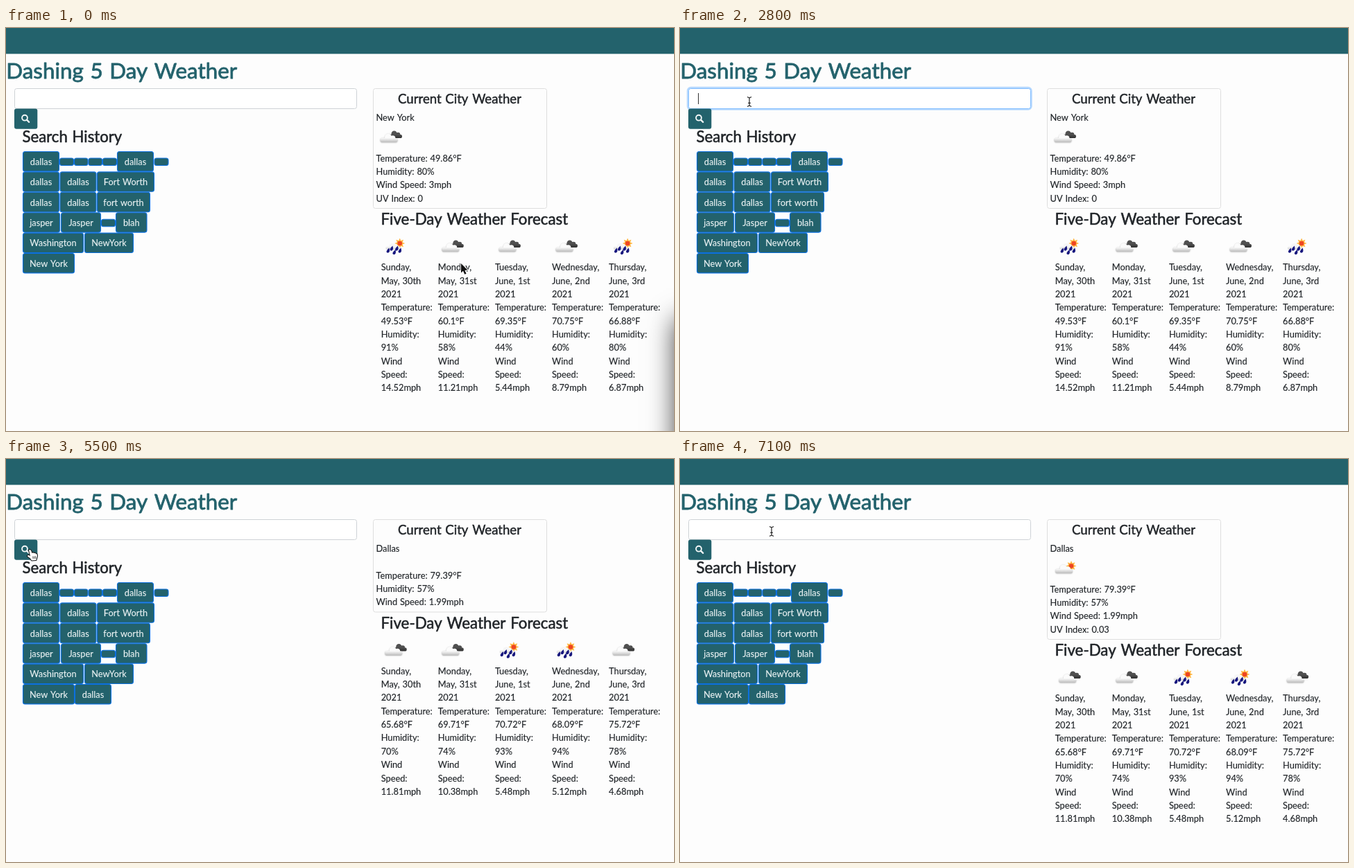
Recreate the animation shown at these times as an HTML page with a canvas. Size 963 by 582 pixels, loop 7.2 s.

```html
<!DOCTYPE html>
<html lang="en">
<head>
<meta charset="utf-8">
<title>Dashing 5 Day Weather</title>
<style>
  html, body { margin: 0; width: 100%; height: 100%; overflow: hidden; background: #fdfdfd; }
  canvas { display: block; }
</style>
</head>
<body>
<canvas id="stage" width="963" height="582"></canvas>
<script>
const ctx = document.getElementById('stage').getContext('2d');
const LOOP = 7200, STEP = 100, LINE = 19.35;
const TEAL = '#23626c', INK = '#212529', PAPER = '#fdfdfd';

// Moments of the session, in ms
const FOCUS = 1800, TYPE = 3000, KEY = 120, TYPED = 3600, MOVE = 4200;
const CLICK = 5000, CLEARED = 5200, RESULT = 5500, COMPLETE = 6100;
const QUERY = 'dallas';

const mousePath = [
  [0, 656, 340], [100, 656, 340], [800, 99, 105], [FOCUS, 99, 105],
  [FOCUS + 100, 100, 106.5], [MOVE, 100, 106.5], [4700, 34, 131],
  [6400, 34, 131], [6900, 132, 104.5], [LOOP, 132, 104.5]
];

// Label, left, right; an empty label is a small pill
const history = [
  [['dallas', 24, 77], ['', 77, 98], ['', 98, 118.5], ['', 118.5, 139], ['', 139, 160],
   ['dallas', 160, 213], ['', 213.5, 234.5]],
  [['dallas', 24, 77], ['dallas', 77.5, 130.5], ['Fort Worth', 131, 214]],
  [['dallas', 24, 77], ['dallas', 77.5, 130.5], ['fort worth', 131, 208]],
  [['jasper', 24, 78], ['Jasper', 79, 137], ['', 137, 158], ['blah', 158, 203.5]],
  [['Washington', 24, 112], ['NewYork', 113, 184]],
  [['New York', 24, 99]]
];

const days = ['Sunday,|May, 30th', 'Monday,|May, 31st', 'Tuesday,|June, 1st',
  'Wednesday,|June, 2nd', 'Thursday,|June, 3rd'];
const newYork = {
  city: 'New York', icon: 'cloudy', temp: '49.86', humidity: 80, wind: '3', uv: '0',
  forecast: [['rain', '49.53', 91, '14.52'], ['cloudy', '60.1', 58, '11.21'],
    ['cloudy', '69.35', 44, '5.44'], ['cloudy', '70.75', 60, '8.79'], ['rain', '66.88', 80, '6.87']]
};
const dallas = {
  city: 'Dallas', icon: 'sunny', temp: '79.39', humidity: 57, wind: '1.99', uv: '0.03',
  forecast: [['cloudy', '65.68', 70, '11.81'], ['cloudy', '69.71', 74, '10.38'],
    ['rain', '70.72', 93, '5.48'], ['rain', '68.09', 94, '5.12'], ['cloudy', '75.72', 78, '4.68']]
};

const clamp = v => Math.max(0, Math.min(1, v));
const ramp = (t, from, to) => clamp((t - from) / (to - from));
const smooth = u => u * u * (3 - 2 * u);

// A thin outline gives headings a medium weight
function text(str, x, y, { size = 12.8, color = INK, outline = 0.15, align = 'left' } = {}) {
  ctx.font = `${size}px Lato, "Open Sans", sans-serif`;
  ctx.wordSpacing = size * 0.05 + 'px';
  ctx.fillStyle = ctx.strokeStyle = color;
  ctx.lineWidth = outline;
  ctx.lineJoin = 'round';
  ctx.textAlign = align;
  ctx.fillText(str, x, y);
  ctx.strokeText(str, x, y);
}

function heading(str, x, y, size, options) {
  text(str, x, y, { size, outline: size * 0.025, ...options });
}

function box(x, y, w, h, r, fill, stroke, line = 1) {
  ctx.beginPath();
  ctx.roundRect(x, y, w, h, r);
  if (fill) { ctx.fillStyle = fill; ctx.fill(); }
  if (stroke) { ctx.strokeStyle = stroke; ctx.lineWidth = line; ctx.stroke(); }
}

function polygon(points, fill, stroke, line = 1) {
  ctx.beginPath();
  points.forEach(p => ctx.lineTo(...p));
  ctx.closePath();
  ctx.lineJoin = 'round';
  if (stroke) { ctx.strokeStyle = stroke; ctx.lineWidth = line; ctx.stroke(); }
  ctx.fillStyle = fill;
  ctx.fill();
}

function lines(paths, color, width) {
  ctx.beginPath();
  for (const [x, y, x2, y2] of paths) { ctx.moveTo(x, y); ctx.lineTo(x2, y2); }
  ctx.strokeStyle = color;
  ctx.lineWidth = width;
  ctx.stroke();
}

function disc(x, y, r, fill) {
  ctx.beginPath();
  ctx.arc(x, y, r, 0, Math.PI * 2);
  ctx.fillStyle = fill;
  ctx.fill();
}

function cloud(x, y, w, h, top, bottom) {
  const g = ctx.createLinearGradient(0, y, 0, y + h);
  g.addColorStop(0, top);
  g.addColorStop(0.5, top);
  g.addColorStop(1, bottom);
  ctx.beginPath();
  ctx.roundRect(x, y + h * 0.5, w, h * 0.5, h * 0.25);
  ctx.moveTo(x + w * 0.66, y + h * 0.42);
  ctx.ellipse(x + w * 0.46, y + h * 0.42, w * 0.2, h * 0.42, 0, 0, Math.PI * 2);
  ctx.moveTo(x + w * 0.88, y + h * 0.55);
  ctx.ellipse(x + w * 0.72, y + h * 0.55, w * 0.16, h * 0.33, 0, 0, Math.PI * 2);
  ctx.fillStyle = g;
  ctx.fill();
}

function sun(x, y) {
  const rays = [];
  for (let i = 0; i < 16; i++) {
    const a = i * Math.PI / 8, r = i % 2 ? 4.2 : 7.5;
    rays.push([x + r * Math.cos(a), y + r * Math.sin(a)]);
  }
  polygon(rays, '#ffb640');
  disc(x, y, 3.3, '#ee4522');
}

function whiteCloud(x, y, w, h) {
  ctx.save();
  ctx.shadowColor = 'rgba(0,0,0,.3)';
  ctx.shadowBlur = 2;
  ctx.shadowOffsetY = 0.6;
  cloud(x, y, w, h, '#fbfbfb', '#bdbdbd');
  ctx.restore();
}

function drop(x, y) {
  ctx.beginPath();
  ctx.moveTo(x + 2.2, y - 4.5);
  ctx.quadraticCurveTo(x + 4.2, y + 2.8, x - 0.2, y + 2.8);
  ctx.quadraticCurveTo(x - 4.4, y + 1.4, x + 2.2, y - 4.5);
  ctx.fillStyle = '#17177e';
  ctx.fill();
}

function weatherIcon(kind, x, y) {
  ctx.save();
  ctx.translate(x, y);
  if (kind === 'cloudy') {
    cloud(16, -8.5, 21, 10.5, '#505050', '#303030');
    whiteCloud(5.5, -4.5, 25, 12.5);
  } else {
    sun(kind === 'rain' ? 27 : 30, kind === 'rain' ? -4 : -2.5);
    if (kind === 'sunny') whiteCloud(7, -4.5, 25, 12.5);
    else {
      cloud(6.5, -4, 21, 9, '#f6f6f6', '#d8d8d8');
      [[9.5, 7], [14.5, 4], [18.5, 9.5], [22, 4], [26.5, 7]].forEach(p => drop(...p));
    }
  }
  ctx.restore();
}

function drawHeader() {
  ctx.fillStyle = PAPER;
  ctx.fillRect(0, 0, 963, 582);
  ctx.fillStyle = TEAL;
  ctx.fillRect(0, 0, 963, 37);
  ctx.fillStyle = 'rgba(35,98,108,.35)';
  ctx.fillRect(0, 37, 963, 1);
  heading('Dashing 5 Day Weather', 0.3, 72.8, 31.4, { color: TEAL });
}

function drawSearch(t) {
  const focus = ramp(t, FOCUS, FOCUS + 150) - ramp(t, CLICK, CLICK + 150);
  if (focus > 0) box(11.5, 86.5, 494.5, 30.5, 4, null, `rgba(0,123,255,${0.28 * focus * focus})`, 3.4);
  const mix = (a, b) => Math.round(a + (b - a) * focus);
  box(12.5, 87.5, 493, 29, 3, '#fff', `rgb(${mix(206, 128)},${mix(210, 189)},${mix(214, 255)})`);

  const typed = t < TYPE || t >= CLEARED ? '' : QUERY.slice(0, Math.floor((t - TYPE) / KEY) + 1);
  text(typed, 25.5, 106, { color: '#495057' });
  const since = t >= TYPE && t < TYPED ? 0 : t - (t < TYPE ? FOCUS : TYPED);
  if (t >= FOCUS && t < CLICK && since % 1000 < 500) {
    const x = Math.round(25.5 + (typed ? ctx.measureText(typed).width : 0)) + 0.5;
    lines([[x, 94, x, 110]], '#333', 1);
  }

  box(12, 116.5, 33.3, 29.3, 3, TEAL);
  ctx.beginPath();
  ctx.arc(27, 129.7, 3.9, 0, Math.PI * 2);
  ctx.strokeStyle = '#f4f8f8';
  ctx.lineWidth = 1.9;
  ctx.stroke();
  ctx.lineCap = 'round';
  lines([[30.2, 132.9, 33.2, 135.9]], '#f4f8f8', 2.2);
  ctx.lineCap = 'butt';
}

function drawHistory(t) {
  heading('Search History', 23.5, 165.3, 22.2);
  history.forEach((row, i) => {
    const y = 178.5 + i * 29.4;
    const items = i === 5 && t >= CLEARED ? [...row, [QUERY, 99, 152]] : row;
    for (const [label, left, right] of items) {
      const top = label ? y : y + 9.5;
      box(left + 0.5, top, right - left - 1, label ? 28.4 : 10.5, 3, TEAL, '#0c70e0', 1.1);
      text(label, (left + right) / 2, y + 19.2, { color: '#e9f1f2', align: 'center' });
    }
  });
}

function drawWeather(t) {
  const data = t < RESULT ? newYork : dallas;
  const partial = t >= RESULT && t < COMPLETE;
  const shift = partial ? -39.5 : 0;
  box(529.5, 87.5, 250, 173 + shift, 3, PAPER, '#dedede');
  heading('Current City Weather', 654, 108.6, 18.6, { align: 'center' });
  text(data.city, 533.5, 133.7);
  if (!partial) weatherIcon(data.icon, 534, 157);
  const facts = [`Temperature: ${data.temp}°F`, `Humidity: ${data.humidity}%`, `Wind Speed: ${data.wind}mph`];
  if (!partial) facts.push(`UV Index: ${data.uv}`);
  facts.forEach((line, i) => text(line, 533.5, (partial ? 172.5 : 192.5) + i * LINE));

  heading('Five-Day Weather Forecast', 540.5, 284.2 + shift, 22.3);
  data.forecast.forEach(([icon, temp, humidity, wind], i) => {
    const x = 540.7 + i * 82.1;
    weatherIcon(icon, x, 315 + shift);
    [...days[i].split('|'), '2021', 'Temperature:', temp + '°F', 'Humidity:', humidity + '%',
      'Wind', 'Speed:', wind + 'mph']
      .forEach((line, n) => text(line, x, 350.2 + shift + n * LINE));
  });
}

function drawWindowShadow() {
  ctx.save();
  ctx.shadowColor = 'rgba(0,0,0,.75)';
  ctx.shadowBlur = 36;
  ctx.fillRect(965, 420, 300, 400);
  ctx.restore();
}

function mouseAt(t) {
  const i = mousePath.findIndex(p => p[0] > t);
  const [t0, x0, y0] = mousePath[i - 1], [t1, x1, y1] = mousePath[i];
  const u = smooth(ramp(t, t0, t1));
  return [x0 + (x1 - x0) * u, y0 + (y1 - y0) * u];
}

function drawArrow() {
  polygon([[0, 0], [0, 13.5], [3, 10.8], [5.2, 15.8], [7.6, 14.7], [5.4, 9.9], [9.4, 9.6]], '#111', '#fff', 1.8);
}

function drawBeam() {
  const strokes = [[0, -5.5, 0, 5.5], [-3, -7, 0, -5.5], [3, -7, 0, -5.5],
    [-3, 7, 0, 5.5], [3, 7, 0, 5.5], [-1.8, 1.8, 1.8, 1.8]];
  lines(strokes, 'rgba(255,255,255,.8)', 3);
  lines(strokes, '#222', 1.2);
}

function drawHand() {
  polygon([[-1, 0.5], [0.5, 0], [2, 1], [3.5, 5], [5, 4.2], [6.5, 5], [8, 4.8], [9.2, 6], [10.5, 6.2],
    [11, 9], [10, 12], [9.5, 15], [3, 15.5], [1, 12.5], [-3, 9.5], [-2.6, 8], [-1, 8], [1, 9.2]],
    '#fff', '#161616', 2);
  lines([[4.6, 9.5, 5, 13], [6.6, 9.3, 6.8, 13], [8.5, 9.2, 8.4, 13]], '#333', 0.8);
}

function drawMouse(t) {
  if (t >= TYPE && t < MOVE) return;
  const [x, y] = mouseAt(t);
  const active = t >= FOCUS;
  const overInput = active && x > 12 && x < 505 && y > 87 && y < 117;
  const overButton = active && x > 12 && x < 46 && y >= 117 && y < 146;
  ctx.save();
  ctx.translate(x, y);
  (overInput ? drawBeam : overButton ? drawHand : drawArrow)();
  ctx.restore();
}

function draw(t) {
  drawHeader();
  drawSearch(t);
  drawHistory(t);
  drawWeather(t);
  if (t < FOCUS) drawWindowShadow();
  drawMouse(t);
}

const start = performance.now();
function tick() {
  const t = Math.max(0, performance.now() - start) % LOOP;
  draw(Math.floor(t / STEP) * STEP);
  requestAnimationFrame(tick);
}
tick();
</script>
</body>
</html>
```
